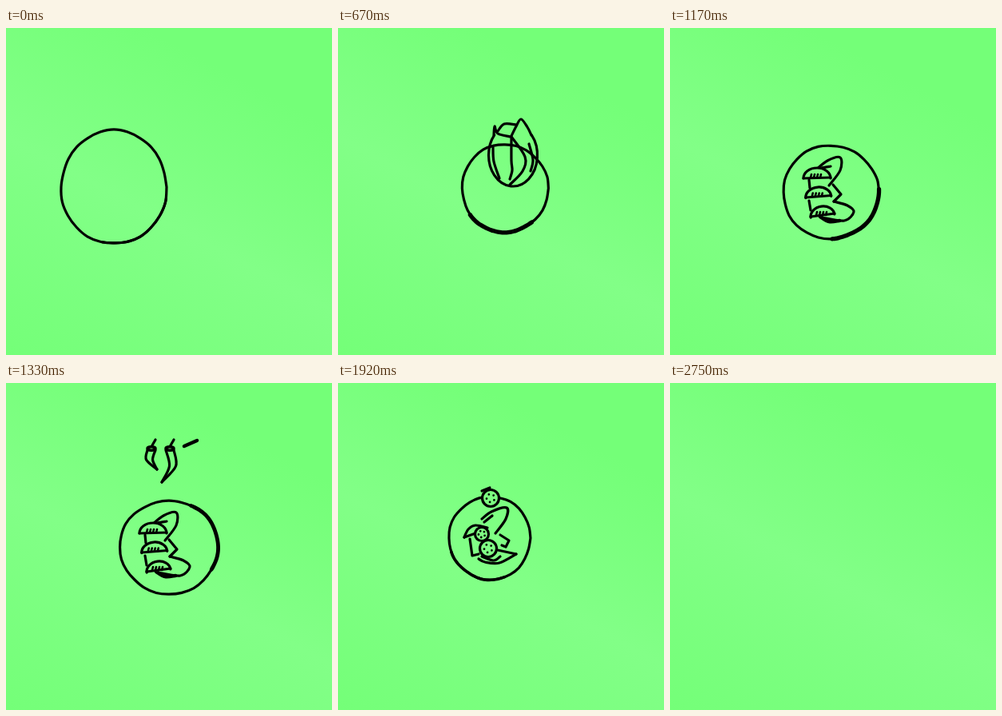
Recreate the animation shown at these times as an HTML page with a canvas. Size 408 by 409 pixels, loop 3510 ms.

```html
<!DOCTYPE html>
<html lang="en">
<head>
<meta charset="utf-8">
<title>Rolling a wrap</title>
<style>
html, body { margin: 0; width: 100%; height: 100%; overflow: hidden; }
body { background: linear-gradient(28deg, #74ff78 0%, #82ff87 43.6%, #74ff78 80%); }
canvas { display: block; }
</style>
</head>
<body>
<canvas id="stage" width="408" height="409"></canvas>
<script>
const LOOP = 3510, FPS = 12, PEN = 3.2;
const { PI, sin, cos } = Math;
const ctx = document.getElementById('stage').getContext('2d');

function line(width, ...xy) {
  ctx.beginPath();
  for (let i = 0; i < xy.length; i += 2) ctx.lineTo(xy[i], xy[i + 1]);
  ctx.lineWidth = width;
  ctx.stroke();
}

// Catmull-Rom curve through a few points.
function curve(width, ...xy) {
  const n = xy.length / 2;
  const at = i => {
    const j = 2 * Math.max(0, Math.min(n - 1, i));
    return [xy[j], xy[j + 1]];
  };
  ctx.beginPath();
  ctx.moveTo(...at(0));
  for (let i = 0; i < n - 1; i++) {
    const [a, b, c, d] = [at(i - 1), at(i), at(i + 1), at(i + 2)];
    ctx.bezierCurveTo(b[0] + (c[0] - a[0]) / 6, b[1] + (c[1] - a[1]) / 6,
      c[0] - (d[0] - b[0]) / 6, c[1] - (d[1] - b[1]) / 6, ...c);
  }
  ctx.lineWidth = width;
  ctx.stroke();
}

function oval(x, y, rx, ry, { from = 0, to = 2 * PI, tilt = 0, width = PEN, solid = false } = {}) {
  ctx.beginPath();
  ctx.ellipse(x, y, rx, ry, tilt, from, to);
  if (solid) {
    // Hide the lines behind the shape.
    ctx.globalCompositeOperation = 'destination-out';
    ctx.fill();
    ctx.globalCompositeOperation = 'source-over';
  }
  ctx.lineWidth = width;
  ctx.stroke();
}

// step, centre, radii, then angle and width of the heaviest part of the line
const plateKeys = [
  [0, 135, 199, 66, 71, 1, PEN],
  [1, 262, 228, 66, 67, 1, PEN],
  [3, 221, 197, 53, 54, 1, 4],
  [5, 221, 196, 51, 52, 1.1, 4.6],
  [11, 197, 205, 57, 58, 2.3, 6],
  [16, 204, 205.5, 61.5, 58.5, -.3, 4.8],
  [23, 190, 194, 51, 52, 2, 3.6],
  [26, 188, 216, 50, 32, 2, PEN]
];

function plate(step) {
  const i = plateKeys.findIndex((k, n) => n && step <= k[0]);
  const [a, b] = [plateKeys[i - 1], plateKeys[i]];
  const p = (step - a[0]) / (b[0] - a[0]);
  const [, x, y, rx, ry, angle, press] = a.map((v, n) => v + (b[n] - v) * p);
  const edge = (from, to) => {
    const xy = [];
    for (let n = 0; n <= 24; n++) {
      const t = from + (to - from) * n / 24;
      const r = 1 + .009 * sin(3 * t + step) + .007 * sin(7 * t + 2 * step);
      xy.push(x + rx * r * cos(t), y + ry * r * sin(t));
    }
    return xy;
  };
  curve(PEN, ...edge(0, 2 * PI));
  curve(press, ...edge(angle - .8, angle + .8));
}

function lettuce() {
  oval(219, 78, 30.5, 39, { from: -.7, to: PI + .7 });
  curve(PEN, 195, 53, 196, 42, 200, 51, 216, 55);
  curve(PEN, 242, 53, 237, 43, 229, 33, 223, 42, 217, 54);
  curve(PEN, 200, 48, 208, 39, 223, 40);
  curve(PEN, 217, 55, 234, 80, 231, 98, 215, 115);
  curve(PEN, 217, 56, 217, 85, 218, 97, 215, 108);
  curve(PEN, 194, 68, 195, 86, 202, 107);
  curve(PEN, 239, 64, 244, 84, 241, 98);
}

function spark() {
  line(2.5, 261, 53, 270, 38, 271, 42, 276, 40, 261, 53);
  line(PEN, 264, 49, 270, 42);
}

function leaf() {
  curve(PEN, 183, 188, 195, 170, 213, 164, 213, 180, 193, 198);
  curve(5.5, 182, 190, 182, 208, 190, 223, 208, 226);
  curve(PEN, 186, 183, 195, 179, 204, 176);
  line(PEN, 201, 197, 212, 204, 206, 214);
  line(PEN, 196, 210, 211, 226);
}

function strips() {
  for (let i = 0; i < 5; i++) {
    const x = 177 + 5.5 * i, y = 77 + 7.5 * i, tilt = -.75 + .07 * i;
    const loop = i % 2 === 0;
    oval(x, y, loop ? 15 : 19, loop ? 4.5 : .5, { tilt, width: loop ? PEN : 4 });
  }
}

function curls() {
  oval(143, 54, 15, 14.5, { from: -.2, to: PI - .2 });
  curve(PEN, 158, 51, 159, 46, 156, 40);
  oval(166, 39, 8, 8, { from: 0, to: PI - .3 });
  line(4, 173, 38, 183, 36);
  oval(189, 25, 12, 12, { from: -1.1, to: 2.3 });
  line(PEN, 194, 13, 195, 20);
}

function greens() {
  curve(PEN, 182, 178, 197, 166, 213, 162, 213, 178, 199, 197);
  curve(PEN, 182, 177, 190, 175, 201, 173);
  line(PEN, 204, 196, 214, 208, 205, 217);
  curve(PEN, 205, 217, 222, 222, 230, 230, 218, 241, 190, 237);
  curve(4.5, 188, 236, 199, 242, 212, 241);
  line(PEN, 174, 190, 175, 200);
  line(PEN, 174, 216, 176, 228);
}

function slice(i) {
  const x = 184 + 1.75 * i * i, y = 188 + 23.5 * i, r = 17 - i;
  oval(x, y, r, 13 - i / 2, { from: PI, to: 2 * PI, tilt: -.07 * i, solid: true });
  line(PEN, x - r, y + i / 2, x + r, y - 1 - i);
  for (let n = -1; n <= 2; n++) line(2.6, x + 4 * n - 4, y - 1, x + 4 * n - 3, y - 5);
}

function pepper(x, length, bend) {
  const y = 84;
  for (const side of [-1, 1])
    curve(PEN, x + 5 * side, y, x - .35 * bend + 4 * side, y + length / 2, x + bend, y + length);
  oval(x, y - 2, 5, 2.2, { width: 3.6 });
  line(PEN, x + 1, y - 6, x + 5, y - 13);
}

function peppers() {
  pepper(182, 24, 7);
  pepper(205, 40, -10);
}

function salad() {
  curve(PEN, 180, 170, 192, 161, 211, 156, 210, 170, 197, 188);
  line(PEN, 183, 174, 193, 166);
  line(PEN, 203, 190, 214, 197, 210, 205, 205, 203);
  line(PEN, 200, 209, 223, 214);
  curve(PEN, 223, 214, 202, 225, 184, 224, 176, 220);
  curve(PEN, 180, 217, 195, 222, 203, 217);
  curve(PEN, 158, 193, 163, 183, 172, 178, 187, 181);
  line(PEN, 158, 193, 172, 188);
  line(PEN, 165, 195, 168, 216, 176, 214);
}

function ball(i, step) {
  const rest = [[180, 189], [188, 207], [186, 190]][i];
  const fall = 80 + 64 * (step - 20 - i);
  const y = Math.min(fall, rest[1]);
  const x = fall < rest[1] ? 191 : rest[0], r = i ? 10.5 : 8.5;
  oval(x, y, r, r, { solid: true });
  for (let n = 0; n < 5; n++) {
    const a = n * 2 * PI / 5 + .5;
    oval(x + r * .48 * cos(a), y + r * .48 * sin(a), .4, .4, { width: 2 });
  }
}

function halfMoon() {
  oval(189, 207, 50, 39, { from: 0, to: PI });
  curve(PEN, 139, 207, 160, 193, 189, 189, 217, 193, 239, 207);
}

function roll() {
  line(PEN, 143, 152, 185, 152, 222, 149, 221, 174, 180, 176, 145, 180);
  curve(PEN, 143, 152, 135, 160, 137, 174, 145, 179);
  line(PEN, 143, 152, 150, 164, 145, 179);
  oval(144, 166, 3.5, 7);
  curve(PEN, 150, 164, 170, 168, 200, 164, 222, 150);
}

function bracket() {
  line(PEN, 233, 200, 219, 202, 221, 240, 224, 260, 231, 261, 239, 257);
}

function tray() {
  line(PEN, 127, 201, 236, 200, 237, 277, 129, 278, 127, 201);
}

// drawing, first and last step, step at its resting height, fall per step
const cast = [
  [plate, 0, 25],
  [lettuce, 5, 8, 5, 27],
  [spark, 5, 5],
  [leaf, 9, 13],
  [curls, 11, 11],
  [strips, 11, 13, 11, 45],
  [greens, 14, 20],
  ...[0, 1, 2].map(i => [() => slice(i), 12 + i, 20]),
  [peppers, 15, 19, 16, 29],
  [() => line(4.5, 223, 79, 239, 72), 16, 16],
  [salad, 21, 25],
  ...[0, 1, 2].map(i => [step => ball(i, step), 20 + i, 25]),
  [() => line(PEN, 180, 135, 190, 131), 23, 23],
  [halfMoon, 26, 26],
  [roll, 27, 30, 28, 30],
  [() => { line(PEN, 168, 184, 168, 186); line(PEN, 194, 181, 197, 186); }, 28, 28],
  [bracket, 28, 28],
  [tray, 29, 32]
];

ctx.lineCap = ctx.lineJoin = 'round';
const start = performance.now();
let shown = -1;

function frame() {
  const t = (performance.now() - start) % LOOP;
  // Step times are rounded to 10 ms, so lean slightly early.
  const step = Math.floor((t + 4) * FPS / 1000);
  if (step !== shown) {
    ctx.clearRect(0, 0, 408, 409);
    for (const [draw, first, last, rest = 0, speed = 0] of cast) {
      if (step < first || step > last) continue;
      ctx.save();
      ctx.translate(0, speed * (step - rest));
      draw(step);
      ctx.restore();
    }
    shown = step;
  }
  requestAnimationFrame(frame);
}
frame();
</script>
</body>
</html>
```
